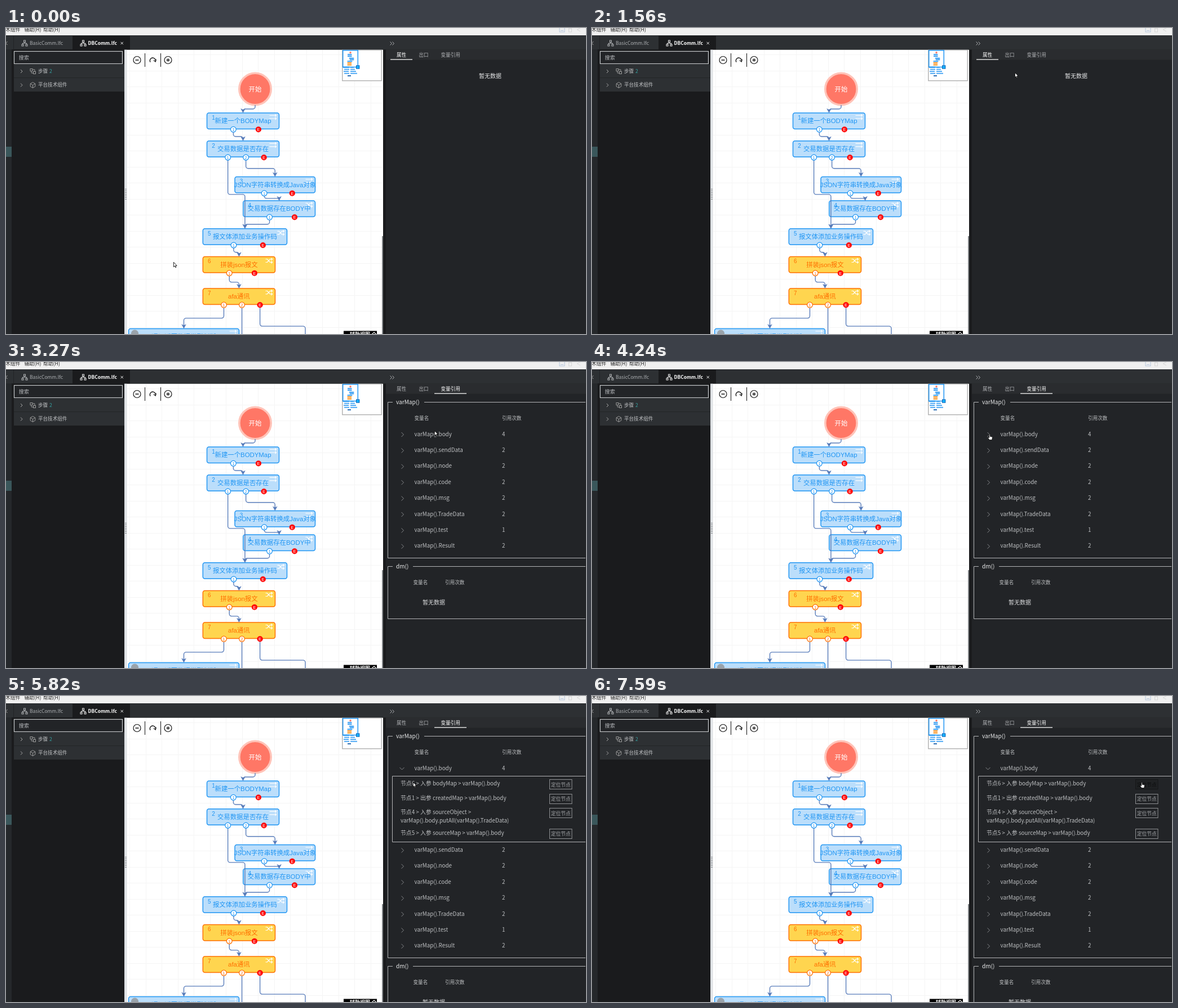
These frames come from a looping animation (1029 px wide and 544 px high, 8 s). An HTML page with a canvas:

```html
<!DOCTYPE html>
<html lang="zh-CN">
<head>
<meta charset="utf-8">
<title>Flow editor</title>
<style>
html, body { margin: 0; width: 100%; height: 100%; overflow: hidden; background: #222427; }
canvas { display: block; }
</style>
</head>
<body>
<canvas id="stage" width="1029" height="544"></canvas>
<script>
const c = document.getElementById('stage').getContext('2d');
const LOOP = 8000, TAB_AT = 2200, OPEN_AT = 4700, PRESS_AT = 7590;
const CJK = '"Noto Sans CJK SC","Noto Sans CJK JP","Noto Sans CJK",sans-serif';
const ARIAL = '"Liberation Sans","Noto Sans CJK SC","Noto Sans CJK JP",sans-serif';
const BLUE = '#2196f3', ORANGE = '#ff6f00', EDGE = '#587cba';
const BAR = '#2d3033', PANEL = '#222427', DARK = '#1a1b1d', SOFT = '#bfc1c3';

function rect(x, y, w, h, fill) {
  c.fillStyle = fill;
  c.fillRect(x, y, w, h);
}

function text(s, x, cy, size, color, { font = CJK, align = 'left', weight = 400 } = {}) {
  c.font = `${weight} ${size}px ${font}`;
  c.textAlign = align;
  c.fillStyle = color;
  c.fillText(s, x, cy + size * 0.37);
}

function line(points, color, width = 1) {
  c.beginPath();
  points.forEach(([x, y]) => c.lineTo(x, y));
  c.strokeStyle = color;
  c.lineWidth = width;
  c.stroke();
}

function frame(x, y, w, h, color, width = 1) {
  c.strokeStyle = color;
  c.lineWidth = width;
  c.strokeRect(x, y, w, h);
}

function circle(x, y, r, fill, stroke, width = 1) {
  c.beginPath();
  c.arc(x, y, r, 0, Math.PI * 2);
  if (fill) { c.fillStyle = fill; c.fill(); }
  if (stroke) { c.strokeStyle = stroke; c.lineWidth = width; c.stroke(); }
}

function chevron(x, y, color, angle = 0, size = 3) {
  c.save();
  c.translate(x, y);
  c.rotate(angle);
  line([[-size / 2, -size], [size / 2, 0], [-size / 2, size]], color);
  c.restore();
}

// Top menu, tabs and component tree
function treeIcon(x, y, color) {
  frame(x - 1.5, y - 5, 3, 3, color);
  line([[x, y - 2], [x, y]], color);
  line([[x - 3.5, y + 2], [x - 3.5, y], [x + 3.5, y], [x + 3.5, y + 2]], color);
  for (const dx of [-5, 2]) frame(x + dx, y + 2, 3, 3, color);
}

function drawShell() {
  rect(0, 0, 1029, 544, PANEL);
  rect(0, 0, 1029, 13, '#f0f0f0');
  ['术组件', '辅助(H)', '帮助(H)'].forEach((s, i) => text(s, -1 + i * 33.5, 2.5, 8.8, '#222'));
  frame(982, -1, 9, 8, '#b4c5dc');
  line([[984, 4.5], [989, 4.5]], '#b4c5dc');
  frame(998.5, 1, 5, 6, '#d5d5d5');
  line([[1019, 0], [1013, 3], [1019, 6]], '#d8d8d8');

  rect(0, 13, 1029, 25.5, BAR);
  rect(0, 38, 10, 506, '#25282b');
  rect(10, 38, 200, 506, DARK);
  rect(0, 211, 10, 18, '#3a575b');
  chevron(1, 27, '#aaa', Math.PI);

  rect(118, 14, 102, 25, DARK);
  line([[13.5, 14], [13.5, 38]], PANEL);
  treeIcon(33, 27, '#b5b7ba');
  text('BasicComm.lfc', 42, 27, 8.5, '#aeb1b4');
  treeIcon(137, 27, '#f4f4f4');
  text('DBComm.lfc', 145.5, 27, 8.4, '#fff', { weight: 700 });
  for (const d of [-2.2, 2.2]) line([[205.7 - d, 24.8], [205.7 + d, 29.2]], '#eee');

  rect(14.5, 41.5, 192, 22, PANEL);
  frame(14.5, 41.5, 192, 22, '#c5c8ca', 1.2);
  text('搜索', 22.5, 52.5, 9.2, '#b5b7ba');
  ['步骤', '平台技术组件'].forEach((s, i) => {
    const y = 76.5 + i * 24.5;
    rect(14, y - 12, 196, 24, BAR);
    chevron(27.5, y + 0.5, '#aaa');
    text(s, 57, y, 8.55, '#c4c6c8');
  });
  text('2', 77, 76.5, 8.55, '#35a5a5');
  frame(43, 72.5, 4, 4, '#999');
  frame(48.5, 77.5, 4, 4, '#999');
  line([[47, 74], [51, 74], [51, 77.5]], '#999');
  line([[45, 76.5], [45, 80], [48.5, 80]], '#999');
  const hex = Array.from({ length: 7 }, (_, i) =>
    [47.5 + 5 * Math.sin(i * Math.PI / 3), 101.5 - 5 * Math.cos(i * Math.PI / 3)]);
  line(hex, '#999');
  line([hex[5], [47.5, 101.5], hex[1]], '#999');
  line([[47.5, 101.5], hex[3]], '#999');
}

// Flow chart: x, y, width, label, number of exits
const NODE_H = 28.5;
const nodes = [
  [356.5, 151, 128, '新建一个BODYMap', 1],
  [356.5, 200.8, 128, '交易数据是否存在', 2],
  [406, 264.5, 142.5, 'JSON字符串转换成Java对象', 1],
  [420.8, 307, 127.7, '交易数据存在BODY中', 1],
  [349.3, 356.8, 149.2, '报文体添加业务操作码', 1],
  [349.3, 406.5, 128.2, '拼装json报文', 1],
  [349.3, 463, 128.2, 'afa通讯', 2],
  [217.5, 534.5, 196, '通讯返回数据类型判断', 0]
].map(([x, y, w, label, exits], i) => {
  const [first, gap] = exits > 1 ? [0.29, 0.25] : [0.366, 0.348];
  const ports = exits ? Array.from({ length: exits + 1 }, (_, k) => x + w * (first + k * gap)) : [];
  const hot = i === 5 || i === 6;
  return { x, y, w, label, ports, hot, mid: x + w / 2, num: exits ? i + 1 : '',
    mix: i > 2 && exits, ink: hot ? ORANGE : BLUE, fill: hot ? '#ffd54f' : '#bbdefb' };
});
// node, port, next node
const links = [[0, 0, 1], [1, 0, 4], [1, 1, 2], [2, 0, 3], [3, 0, 4], [4, 0, 5], [5, 0, 6], [6, 0, 7]];

function edge(x1, y1, x2, y2) {
  const my = (y1 + y2) / 2;
  const r = Math.min(4, Math.abs(x2 - x1) / 2, my - y1);
  c.beginPath();
  c.moveTo(x1, y1);
  c.arcTo(x1, my, x2, my, r);
  c.arcTo(x2, my, x2, y2, r);
  c.lineTo(x2, y2 - 3);
  c.strokeStyle = EDGE;
  c.lineWidth = 1.4;
  c.stroke();
  c.beginPath();
  c.moveTo(x2, y2);
  c.lineTo(x2 - 4.3, y2 - 8);
  c.lineTo(x2, y2 - 6);
  c.lineTo(x2 + 4.3, y2 - 8);
  c.fillStyle = EDGE;
  c.fill();
}

function drawEdges() {
  const bottom = n => n.y + NODE_H + 5.7;
  edge(442, 137, nodes[0].mid, nodes[0].y);
  for (const [a, p, b] of links) edge(nodes[a].ports[p], bottom(nodes[a]), nodes[b].mid, nodes[b].y);
  const last = nodes[6];
  line([[last.ports[1], bottom(last)], [last.ports[1], 544]], EDGE, 1.4);
  edge(last.ports[2], bottom(last), 531, 563);
}

function nodeIcon(x, y, mix) {
  const r = x + 12, h = 5.5;
  for (const [a, b] of [[0, h], [h, 0]]) {
    const end = mix ? b : a;
    line([[x, y + a], [x + 3, y + a], [x + 8, y + end], [r, y + end]], '#fff', 1.2);
    line([[r - 2, y + a - 2], [r, y + a], [r - 2, y + a + 2]], '#fff', 1.1);
  }
}

function drawNode(n) {
  c.beginPath();
  c.roundRect(n.x, n.y, n.w, NODE_H, 3.5);
  c.fillStyle = n.fill;
  c.fill();
  c.strokeStyle = n.ink;
  c.lineWidth = 1.5;
  c.stroke();
  nodeIcon(n.x + n.w - 17, n.y + 4.5, n.mix);
  text(n.label, n.mid, n.y + 14.2, 11.4, n.ink, { font: ARIAL, align: 'center' });
  text(n.num, n.x + 11.5, n.y + 8, 10, n.ink, { font: ARIAL, align: 'center' });
}

function drawPorts(n) {
  const y = n.y + NODE_H + 0.8;
  n.ports.forEach((x, i) => {
    const err = i === n.ports.length - 1;
    circle(x, y, 4.9, err ? '#f00' : '#fff', err ? '#f00' : n.ink, err ? 0.4 : 1.3);
    text(err ? 'E' : i + 1, x, y, 7.6, err ? '#fff' : n.ink, { font: ARIAL, align: 'center' });
  });
}

function drawMap() {
  rect(597, 39, 69, 55, '#fff');
  frame(596.8, 39, 69.4, 54.7, '#b0b0b0', 1.4);
  c.save();
  c.translate(597.7, 39.7);
  c.scale(0.0587, 0.0587);
  c.translate(-215, -39);
  circle(442, 108, 29, '#ff7766');
  drawEdges();
  for (const n of nodes) rect(n.x, n.y - 4, n.w, 38, n.hot ? '#ff9520' : '#48a6f4');
  c.restore();
  for (let i = 0; i < 4; i++) {
    rect(599 + i % 2, 69 + i * 3.6, 9, 1.9, '#48a6f4');
    rect(611, 69 + i * 3.6, 6 + i * 2, 1.9, '#48a6f4');
  }
  rect(606, 84, 6, 2, '#2d6fb5');
  frame(597.7, 39.7, 26.6, 29.8, BLUE, 1.5);
  rect(621, 66.3, 6.4, 6.4, '#0d62b5');
  rect(622, 67.3, 4.4, 4.4, '#16b2ff');
}

function drawTools() {
  const k = '#111';
  for (const x of [232.5, 287.5]) {
    circle(x, 57, 6.5, null, k, 1.2);
    line([[x - 3, 57], [x + 3, 57]], k, 1.3);
  }
  line([[287.5, 54], [287.5, 60]], k, 1.3);
  for (const x of [246.5, 274.5]) line([[x, 45], [x, 69]], k);
  c.beginPath();
  c.arc(260.3, 58, 5, Math.PI * 0.82, Math.PI * 2);
  c.lineWidth = 1.4;
  c.stroke();
  line([[262, 57.5], [265.3, 60], [266.3, 55.7]], k, 1.3);
}

function drawFlow() {
  c.save();
  c.beginPath();
  c.rect(210, 38.5, 459, 506);
  c.clip();
  rect(210, 38.5, 459, 506, '#fff');
  for (let x = 219; x < 667; x += 28.5) rect(Math.round(x), 39, 1, 505, '#f5f5f5');
  for (let y = 47; y < 544; y += 28.5) rect(215, Math.round(y), 452, 1, '#f5f5f5');
  rect(210, 38.5, 4.5, 506, '#dfe2e5');
  for (let y = 286; y < 307; y += 3) rect(211, y, 3, 1, '#7d8083');
  drawTools();
  circle(442, 108.5, 28.2, '#ff7766', '#ffc3b8', 3.6);
  text('开始', 442, 108.5, 11.4, '#fff', { align: 'center' });
  nodes.forEach(drawNode);
  circle(228.5, 543, 6.5, '#9aa3ab');
  drawEdges();
  nodes.forEach(drawPorts);
  drawMap();
  rect(667, 370, 2, 174, '#85888b');
  rect(599, 538.5, 59, 6, '#000');
  text('辅助视图', 610, 545, 9, '#fff', { weight: 700 });
  line([[649, 544.5], [653, 541], [657, 544.5]], '#fff', 1.2);
  c.restore();
}

// Property panel
const counts = { body: 4, sendData: 2, node: 2, code: 2, msg: 2, TradeData: 2, test: 1, Result: 2 };
const refs = [
  '节点6 > 入参 bodyMap > varMap().body',
  '节点1 > 出参 createdMap > varMap().body',
  '节点4 > 入参 sourceObject >\nvarMap().body.putAll(varMap().TradeData)',
  '节点5 > 入参 sourceMap > varMap().body'
];

function group(title, top, bottom, gap) {
  line([[686, top], [677.5, top], [677.5, bottom], [1028, bottom]], '#b4b5b7');
  line([[gap, top], [1028, top]], '#b4b5b7');
  text(title, 692, top - 0.5, 10.1, '#e8e9ea', { weight: 500 });
}

function locateButton(y, state) {
  if (state) rect(964.5, y - 9, 39.5, 18, '#1f2123');
  frame(964.5, Math.round(y - 9) + 0.5, 39.5, 17, ['#8f9194', '#3a3c3f', '#151618'][state]);
  text('定位节点', 984.3, y, 8.7, ['#a3a5a8', '#4a4c4f', '#0c0d0e'][state], { align: 'center' });
}

function drawRefs(state) {
  line([[1028, 142.5], [685.5, 142.5], [685.5, 259.5], [1028, 259.5]], '#b4b5b7');
  let y = 155.5;
  refs.forEach((ref, i) => {
    const parts = ref.split('\n');
    parts.forEach((s, k) => text(s, 700, y + k * 14.5, 9.85, SOFT));
    locateButton(y + 1.8, i ? 0 : state);
    y += 25.5 + (parts.length - 1) * 11;
  });
}

function drawVars(t, state) {
  const open = t >= OPEN_AT, shift = open ? 117 : 0;
  group('varMap()', 71.5, 348.5 + shift, 742);
  text('变量名', 724.5, 99.5, 8.6, SOFT);
  text('引用次数', 880, 99.5, 8.6, SOFT);
  Object.entries(counts).forEach(([name, count], i) => {
    const y = 128 + i * 28.4 + (i ? shift : 0);
    const turn = i || !open ? 0 : t < OPEN_AT + 150 ? Math.PI / 4 : Math.PI / 2;
    chevron(turn ? 702.5 : 703.5, y + 1, '#85878a', turn, 4);
    text(`varMap().${name}`, 724.5, y, 9.8, SOFT);
    text(count, 880, y, 9.8, SOFT);
  });
  if (open) drawRefs(state);
  group('dm()', 363.5 + shift, 456.5 + shift, 722);
  text('变量名', 722.5, 392 + shift, 8.6, SOFT);
  text('引用次数', 779, 392 + shift, 8.6, SOFT);
  text('暂无数据', 739, 427.5 + shift, 10, '#dcdddf');
}

function drawPanel(t, target) {
  const vars = t >= TAB_AT;
  rect(669, 38.5, 5, 506, DARK);
  rect(674, 38.5, 355, 18, '#2a2c2f');
  for (const x of [683, 687]) chevron(x, 27.5, '#b5b7ba');
  text('属性', 693, 47.8, 8.55, vars ? '#b0b2b5' : '#fff');
  text('出口', 732.5, 47.8, 8.55, '#b0b2b5');
  text('变量引用', 771.5, 47.8, 8.55, vars || target === 'tab' ? '#fff' : '#b0b2b5');
  rect(vars ? 760 : 682, 55.3, vars ? 57 : 39, 1.4, '#e8e8e8');
  if (vars) drawVars(t, target !== 'button' ? 0 : t < PRESS_AT ? 1 : 2);
  else text('暂无数据', 839, 85.5, 10, '#e8e9ea');
}

// Pointer moves: start, end, x, y
const moves = [
  [0, 150, 297, 413], [240, 370, 425, 309], [390, 630, 492, 302], [630, 1020, 676, 183],
  [1020, 1170, 697, 168], [1170, 1560, 750, 79], [1560, 1950, 771, 48], [2720, 2850, 773, 77],
  [2850, 2990, 760, 117], [3150, 3390, 760, 125], [3410, 3690, 752, 128], [3850, 4240, 702, 128],
  [5290, 5670, 719, 149], [5670, 5820, 722, 153], [5820, 6220, 737, 157], [6220, 6370, 866, 157],
  [6370, 7000, 970, 153], [7000, 7150, 972, 153]
];
const TICK = 130;
const ARROW = new Path2D('M.4.4V8.8L2.3 7 3.6 9.8 4.9 9.2 3.7 6.5H6.2Z');
const HAND = new Path2D('M2.6 1.2Q3.4.1 4.2 1.2V4.2L7.7 5Q8.5 5.3 8.4 6.2L7.7 10.6H3.3L.6 7.2Q.4 6 1.5 6.1L2.6 7Z');

// The pointer is sampled a few times per move, so it advances in hops.
function pointerAt(t) {
  let x = 297, y = 416;
  for (const [from, to, tx, ty] of moves) {
    if (t < from) break;
    const hops = Math.round((to - from) / TICK);
    const p = Math.min(1, Math.floor((t - from) / (to - from) * hops + 1e-6) / hops);
    const k = p * (1.5 - p / 2);
    x += (tx - x) * k;
    y += (ty - y) * k;
  }
  return [x, y];
}

function hit(x, y) {
  const inside = (l, t, r, b) => x >= l && x <= r && y >= t && y <= b;
  if (inside(768, 40, 820, 57)) return 'tab';
  if (inside(696, 122, 706, 132)) return 'row';
  if (inside(962, 148, 1004, 166)) return 'button';
  return '';
}

function drawPointer(x, y, hand) {
  const shape = hand ? HAND : ARROW;
  c.save();
  c.translate(Math.round(x), Math.round(y));
  c.fillStyle = '#fff';
  c.strokeStyle = '#111';
  c.lineWidth = 0.9;
  c.fill(shape);
  c.stroke(shape);
  c.restore();
}

function tick(now) {
  const t = Math.max(0, now - start) % LOOP;
  const [x, y] = pointerAt(t);
  const target = hit(x, y);
  drawShell();
  drawFlow();
  drawPanel(t, target);
  drawPointer(x, y, target);
  requestAnimationFrame(tick);
}
const start = performance.now();
tick(start);
</script>
</body>
</html>
```
